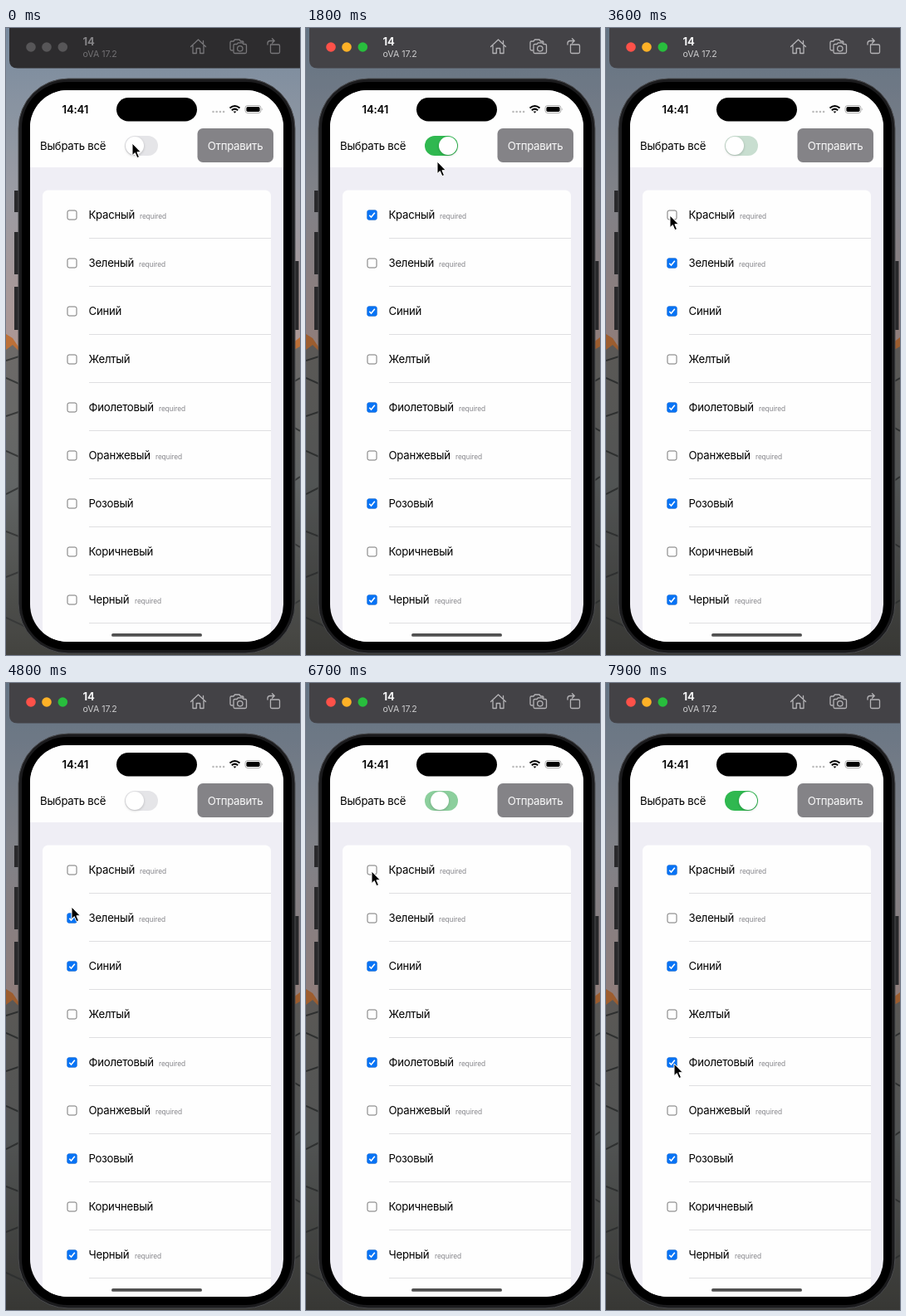
Animation, 354 px wide and 756 px high, one loop 8 s. Source, as an HTML page:

```html
<!DOCTYPE html>
<html lang="ru">
<head>
<meta charset="utf-8">
<style>
html, body { margin: 0; width: 100%; height: 100%; overflow: hidden; background: #555; }
svg { display: block; width: 354px; height: 756px; font-family: Inter, Roboto, sans-serif; }
.label { font-size: 13.2px; letter-spacing: -.25px; }
.hint { font-size: 8.3px; fill: #85858a; letter-spacing: -.1px; }
</style>
</head>
<body>
<svg viewBox="0 0 354 756">
  <defs>
    <linearGradient id="sky" x2="0" y2="1">
      <stop stop-color="#7f93a8"/><stop offset=".5" stop-color="#a4a6ae"/><stop offset="1" stop-color="#b8a09d"/>
    </linearGradient>
    <linearGradient id="rock" x2="0" y2="1">
      <stop stop-color="#74716e"/><stop offset=".45" stop-color="#686b6b"/><stop offset="1" stop-color="#474743"/>
    </linearGradient>
    <clipPath id="screen"><rect x="29" y="75" width="305" height="665" rx="45"/></clipPath>
  </defs>

  <rect width="354" height="385" fill="url(#sky)"/>
  <path d="M0 369L8 374 16 386V410H0zM346 379L354 373V400H346z" fill="#c8773c"/>
  <path d="M0 388L8 382 18 392H340L354 384V756H0z" fill="url(#rock)"/>
  <path d="M0 401L16 396M0 422L18 430M0 468L18 462M0 510L18 518M0 562L18 553M0 607L18 614M0 662L18 655M0 711L28 724M344 428L354 422M344 480L354 486M344 548L354 541M344 620L354 626M338 700L354 690"
        stroke="#3b3d3d" stroke-width="2" fill="none"/>
  <rect id="shade" width="354" height="756" opacity=".2"/>

  <path id="bar" d="M4 0H354V48.5H14Q4 48.5 4 39z"/>
  <g id="lights"><circle cx="30" cy="23" r="5.8"/><circle cx="49" cy="23" r="5.8"/><circle cx="68.3" cy="23" r="5.8"/></g>
  <g id="title">
    <text x="92.5" y="21" font-size="13" font-weight="700">14</text>
    <text x="92.5" y="34.5" font-size="10.6" opacity=".78">oVA 17.2</text>
  </g>
  <g id="icons" fill="none" stroke-width="1.3" stroke-linejoin="round" stroke-linecap="round">
    <path d="M222.5 22.5L231.5 14 240.5 22.5M225 21V30.5H229.3V24.5H233.7V30.5H238V21M237.5 19V15.5"/>
    <path d="M273 27H271.5Q270 27 270 25V17.5Q270 16 271.5 16H274L275.5 14H281L282.5 16H284.5Q286 16 286 17.5"/>
    <path d="M275.5 19.5H278L279.5 17.8H284.5L286 19.5H288Q289.5 19.5 289.5 21V29Q289.5 30.5 288 30.5H275.5Q274 30.5 274 29V21Q274 19.5 275.5 19.5z"/>
    <circle cx="281.8" cy="24.8" r="3.2"/>
    <path d="M318.5 20H328Q329.5 20 329.5 21.5V29Q329.5 30.5 328 30.5H320Q318.5 30.5 318.5 29zM315 20V18.5Q315 15.5 318 15.5H323M320.5 12.8L323.3 15.5 320.5 18.2"/>
  </g>

  <path d="M10 196H16V222H10zM10 246H16V297H10zM10 312H16V364H10zM347 281H352.5V364H347z" fill="#29292b"/>
  <rect x="15" y="61" width="333" height="693" rx="60" fill="#1b1b1d" stroke="#4b4c4f"/>
  <rect x="19" y="65" width="325" height="685" rx="55"/>

  <g clip-path="url(#screen)">
    <rect x="29" y="75" width="305" height="665" fill="#efeef5"/>
    <rect x="29" y="75" width="305" height="93" fill="#fefefe"/>
    <rect x="44" y="195.5" width="275" height="600" rx="7" fill="#fefefe"/>
    <g id="rows"></g>
  </g>

  <text x="67.5" y="102.5" font-size="13.2" font-weight="600" letter-spacing="-.2">14:41</text>
  <rect x="133" y="84" width="97" height="28.5" rx="14.2"/>
  <path d="M249.5 101H264" stroke="#bbb" stroke-width="2.6" stroke-linecap="round" stroke-dasharray="0 4.2"/>
  <g fill="none" stroke="#000" stroke-width="2">
    <path d="M269.5 96.6Q275.5 91.3 281.5 96.6M271.8 99.2Q275.5 96 279.2 99.2"/>
    <path d="M273.6 100.6H277.4L275.5 102.8z" fill="#000" stroke="none"/>
  </g>
  <rect x="288" y="93.5" width="19" height="9" rx="3" fill="#fff" stroke="#999" stroke-width=".8"/>
  <rect x="289.4" y="94.9" width="16.2" height="6.2" rx="1.8"/>
  <path d="M308.5 96.5Q310 98 308.5 99.5z" fill="#999"/>

  <text class="label" x="41" y="146.5">Выбрать всё</text>
  <rect id="track" x="143" y="130" width="40" height="24" rx="12"/>
  <circle id="thumb" cy="142" r="11" fill="#fff" style="filter: drop-shadow(0 1.5px 1.5px #0003)"/>
  <rect x="230.5" y="121" width="91.5" height="41" rx="6.5" fill="#848387"/>
  <text class="label" x="276" y="146.5" fill="#fafafa" text-anchor="middle">Отправить</text>
  <rect x="127" y="730" width="109" height="3.8" rx="1.9" fill="#505050"/>

  <path id="cursor" d="M0 0V14.6L3.3 11.6 5.9 17.6 8.5 16.5 5.9 10.7H10.4z" stroke="#fff" stroke-width="1" stroke-linejoin="round"/>
</svg>
<script>
const $ = id => document.getElementById(id);
const clamp = v => Math.max(0, Math.min(1, v));
const ease = v => v * v * (3 - 2 * v);

// name, hint offset, checked at a given time
const rows = [
  ['Красный', 161, t => t >= 700 && t < 3400 || t >= 6800],
  ['Зеленый', 160, t => t >= 2800 && t < 5200],
  ['Синий', 0, t => t >= 700],
  ['Желтый', 0, () => false],
  ['Фиолетовый', 184, t => t >= 700],
  ['Оранжевый', 180, () => false],
  ['Розовый', 0, t => t >= 700],
  ['Коричневый', 0, () => false],
  ['Черный', 155, t => t >= 700]
];

$('rows').innerHTML = rows.map(([name, hintX], i) => `
  <g transform="translate(0 ${58 * i})">
    <rect x="74" y="220" width="11" height="11" rx="2" fill="#fff" stroke="#767676"/>
    <g class="check">
      <rect x="73.5" y="219.5" width="12" height="12" rx="2" fill="#0773f5"/>
      <path d="M76.3 225.8L78.5 228 82.8 222.8" fill="none" stroke="#fff" stroke-width="1.6"/>
    </g>
    <text class="label" x="99.5" y="229.7">${name}</text>
    ${hintX ? `<text class="hint" x="${hintX}" y="230">required</text>` : ''}
    <path d="M100 253.5H319" stroke="#dfdfe1"/>
  </g>`).join('');
const checks = document.querySelectorAll('.check');

// time, x, y
const path = [
  [0, 152, 139], [400, 152.5, 139.5], [1300, 153, 139.5], [1800, 158, 161], [2100, 76, 557],
  [2600, 79, 282], [2900, 79, 282], [3200, 77, 226], [4200, 77, 226], [4800, 79, 270],
  [5000, 78, 281], [5400, 78, 281], [5800, 78, 229], [6100, 79, 227], [7000, 79, 227],
  [7500, 85, 569], [7600, 85, 569], [7900, 82, 459], [8000, 82, 459]
];

function cursorAt(t) {
  const i = path.findIndex(p => p[0] > t);
  const [t0, x0, y0] = path[i - 1], [t1, x1, y1] = path[i];
  const k = ease((t - t0) / (t1 - t0));
  return [x0 + (x1 - x0) * k, y0 + (y1 - y0) * k];
}

const toggles = [[520, 1], [3250, -1], [6600, 1]];
const toggleAt = (t, duration) =>
  toggles.reduce((sum, [start, sign]) => sum + sign * ease(clamp((t - start) / duration)), 0);
const mix = (a, b, k) => `rgb(${a.map((v, i) => Math.round(v + (b[i] - v) * k))})`;

function draw(t) {
  const active = t >= 400;
  $('shade').setAttribute('opacity', active ? .22 : .06);
  $('bar').setAttribute('fill', active ? '#434246' : '#2d2c2e');
  $('title').setAttribute('fill', active ? '#f4f4f5' : '#858487');
  $('icons').setAttribute('stroke', active ? '#b4b3b6' : '#777679');
  ['#fe5149', '#fdb127', '#28bd3d'].forEach((color, i) =>
    $('lights').children[i].setAttribute('fill', active ? color : '#575658'));

  checks.forEach((check, i) => check.setAttribute('visibility', rows[i][2](t) ? 'visible' : 'hidden'));
  $('thumb').setAttribute('cx', 155 + 16 * toggleAt(t, 240));
  const tint = 1 - (1 - clamp(toggleAt(t, 400))) ** 4;
  $('track').setAttribute('fill', mix([229, 229, 232], [48, 184, 80], tint));
  $('cursor').setAttribute('transform', `translate(${cursorAt(t)})`);
}

const FRAME = 100, LOOP = 8000;
function tick() {
  draw(Math.floor(performance.now() % LOOP / FRAME) * FRAME);
  requestAnimationFrame(tick);
}
tick();
</script>
</body>
</html>
```
